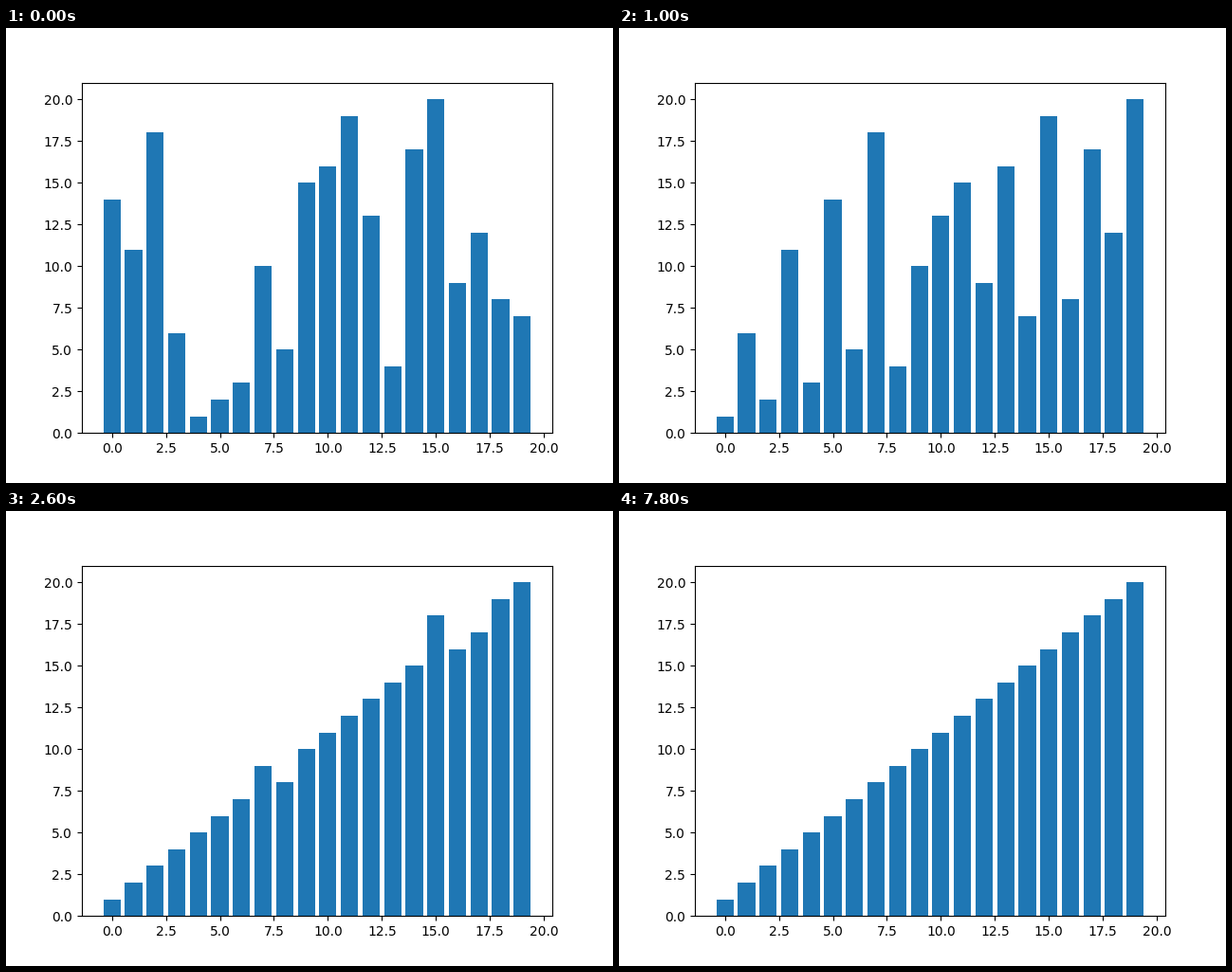
Write a matplotlib script that moves like this. It is 640x480 px and loops after 8 s.

```python
import matplotlib.pyplot as plt
from matplotlib.animation import FuncAnimation

VALUES = [14, 11, 18, 6, 1, 2, 3, 10, 5, 15,
          16, 19, 13, 4, 17, 20, 9, 12, 8, 7]
FRAMES = 40
INTERVAL = 200


def odd_even_sort(values, steps):
    """Return the list after each pass of an odd-even transposition sort."""
    current = list(values)
    states = [list(current)]
    for step in range(steps - 1):
        for i in range(step % 2, len(current) - 1, 2):
            if current[i] > current[i + 1]:
                current[i], current[i + 1] = current[i + 1], current[i]
        states.append(list(current))
    return states


states = odd_even_sort(VALUES, FRAMES)

plt.rcParams["font.family"] = "DejaVu Sans"
fig, ax = plt.subplots(figsize=(6.4, 4.8), dpi=100)
bars = ax.bar(range(len(VALUES)), VALUES, color="#1f77b4")


def update(frame):
    for bar, height in zip(bars, states[frame]):
        bar.set_height(height)
    return bars


anim = FuncAnimation(fig, update, frames=FRAMES, interval=INTERVAL,
                     repeat=True, repeat_delay=0, blit=False)
plt.show()
```
